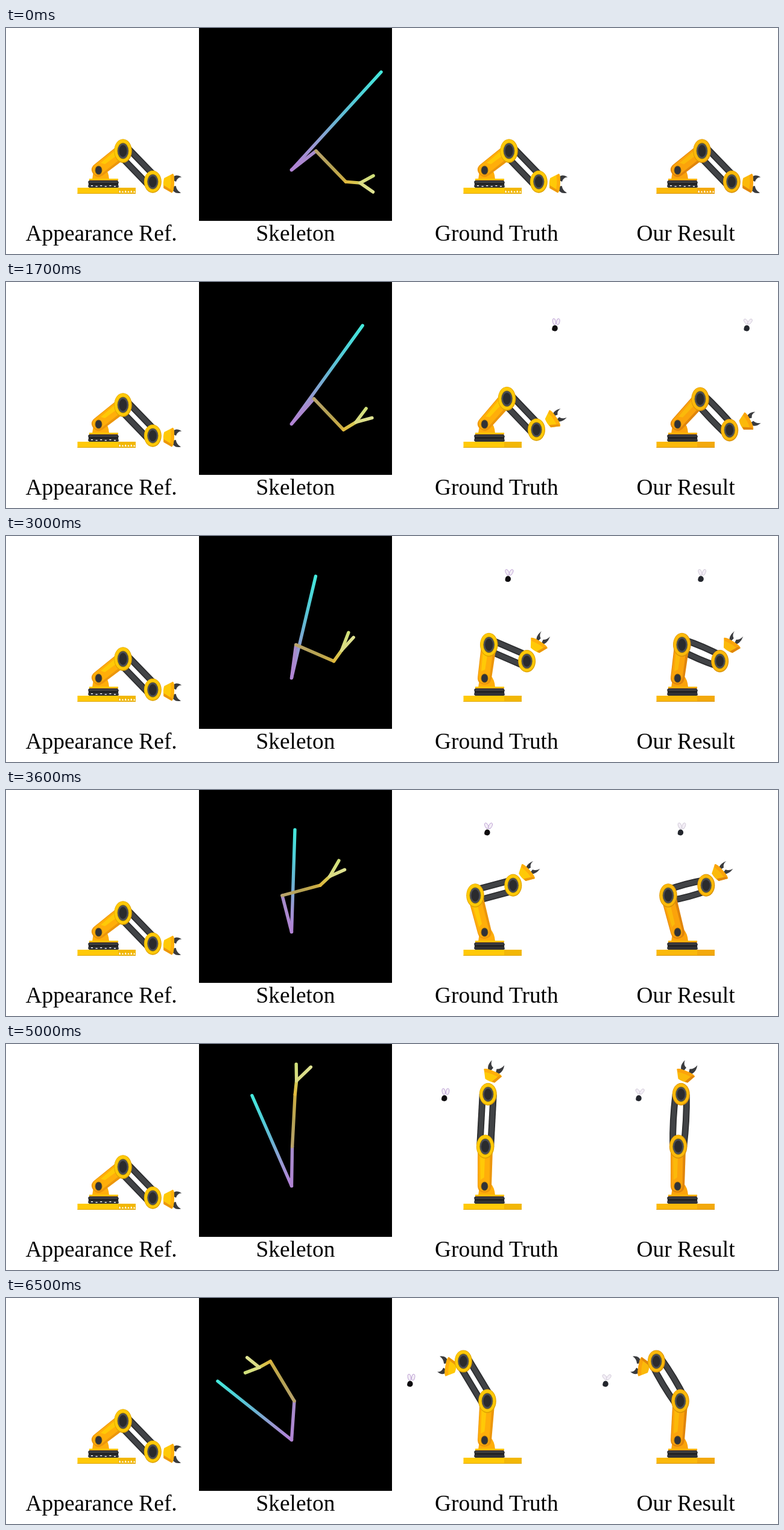
An HTML page with a canvas that plays this animation: 1280 by 375 pixels, repeating every 6600 ms.

```html
<!DOCTYPE html>
<html lang="en">
<head>
<meta charset="utf-8">
<title>Robot arm comparison</title>
<style>
  html, body { margin: 0; width: 100%; height: 100%; overflow: hidden; background: #fff; }
  canvas { position: absolute; left: 0; top: 0; }
  span {
    position: absolute; top: 321px; white-space: nowrap; color: #000;
    font: 37.4px/40px "Liberation Serif", Times, serif;
  }
</style>
</head>
<body>
<canvas id="stage" width="1280" height="375"></canvas>
<span style="left:32.5px">Appearance Ref.</span>
<span style="left:414.5px">Skeleton</span>
<span style="left:711px">Ground Truth</span>
<span style="left:1045.5px">Our Result</span>
<script>
const ctx = document.getElementById('stage').getContext('2d');
const STEP = 100, LOOP = 6600;
const BASE = { x: 153.5, y: 235.5 };

// time, elbow x y, forearm angle length, hand angle length,
// finger angles, finger lengths, fly x y
const KEYS = [
  [0,    194, 204,   46, 71,    5, 24,  -29,   35, 25, 26, 302, 73],
  [900,  193, 199,   47, 70,    5, 25,  -28,   40, 24, 25, 306, 75],
  [2400, 186, 188,   45, 72,  -61, 23,  -74,  -60, 32, 30, 228, 69],
  [3600, 138, 175,  -15, 65,  -43, 22,  -60,  -24, 30, 27, 159, 66],
  [4400, 145, 174,  -71, 83,  -29, 25,  -47,   12, 25, 25, 117, 69],
  [5100, 156, 170,  -90, 87,  -95, 22, -100,  -55, 28, 34,  83, 89],
  [5500, 160, 171, -108, 80, -139, 21, -136,  -96, 28, 36,  63, 105],
  [6500, 158, 171, -121, 77, -209, 21, -201, -141, 25, 26,  31, 138]
];

const slope = (i, c) => (KEYS[i + 1][c] - KEYS[i][c]) / (KEYS[i + 1][0] - KEYS[i][0]);

function tangent(i, c) {
  if (i === 0) return slope(0, c);
  if (i === KEYS.length - 1) return slope(i - 1, c);
  const a = slope(i - 1, c), b = slope(i, c);
  if (c >= 11) {
    const h0 = KEYS[i][0] - KEYS[i - 1][0], h1 = KEYS[i + 1][0] - KEYS[i][0];
    return (a * h1 + b * h0) / (h0 + h1);
  }
  return a * b <= 0 ? 0 : 2 * a * b / (a + b);
}

function value(t, c) {
  let i = 0;
  while (i < KEYS.length - 2 && t >= KEYS[i + 1][0]) i++;
  const h = KEYS[i + 1][0] - KEYS[i][0], u = (t - KEYS[i][0]) / h, v = 1 - u;
  return KEYS[i][c] * (1 + 2 * u) * v * v + KEYS[i + 1][c] * u * u * (3 - 2 * u)
    + h * u * v * (tangent(i, c) * v - tangent(i + 1, c) * u);
}

const rad = d => d * Math.PI / 180;
const polar = (p, deg, r) => ({ x: p.x + r * Math.cos(rad(deg)), y: p.y + r * Math.sin(rad(deg)) });

function pose(t) {
  const k = c => value(t, c);
  const elbow = { x: k(1), y: k(2) };
  const wrist = polar(elbow, k(3), k(4));
  const hand = polar(wrist, k(5), k(6));
  return {
    elbow, wrist, hand,
    tip1: polar(hand, k(7), k(9)),
    tip2: polar(hand, k(8), k(10)),
    aim: (k(7) + k(8)) / 2,
    spread: k(8) - k(7),
    reach: (k(9) + k(10)) / 2,
    fly: { x: k(11), y: k(12) }
  };
}

function rect(color, x, y, w, h) {
  ctx.fillStyle = color;
  ctx.fillRect(x, y, w, h);
}

function poly(color, pts) {
  ctx.fillStyle = color;
  ctx.beginPath();
  pts.forEach(([x, y]) => ctx.lineTo(x, y));
  ctx.fill();
}

function oval(color, x, y, rx, ry, turn = 0) {
  ctx.fillStyle = color;
  ctx.beginPath();
  ctx.ellipse(x, y, rx, ry, turn, 0, 7);
  ctx.fill();
}

function shape(color, path) {
  ctx.fillStyle = color;
  ctx.fill(new Path2D(path));
}

function bone(a, b, colors) {
  const g = ctx.createLinearGradient(a.x, a.y, b.x, b.y);
  colors.forEach((c, i) => g.addColorStop(i / (colors.length - 1), c));
  ctx.strokeStyle = g;
  ctx.lineWidth = 5.4;
  ctx.lineCap = 'round';
  ctx.beginPath();
  ctx.moveTo(a.x, a.y);
  ctx.lineTo(b.x, b.y);
  ctx.stroke();
}

function skeleton(p) {
  rect('#000', 0, 0, 320, 320);
  bone(BASE, p.fly, ['#b47fd8', '#9a98d2', '#68b4d2', '#4fd0d8', '#45e8dc']);
  bone(BASE, p.elbow, ['#b184d4', '#a58cca']);
  bone(p.elbow, p.wrist, ['#b9a36c', '#b5a254', '#cfae42']);
  bone(p.wrist, p.hand, ['#e0b83c', '#d4cc58']);
  bone(p.hand, p.tip2, ['#d8d880', '#dfe392']);
  bone(p.hand, p.tip1, ['#dcdc84', '#cfdf78']);
}

function base(tone, state) {
  if (state === 'gone') {
    for (let i = 0; i < 6; i++) rect(tone.ring, 119 + i * 12.7, 270 + i % 3, 1.5, 1);
    rect(tone.ring, 183, 267, 1.5, 8);
  } else {
    rect(tone.ring, 118.5, 265, 67.5, 10);
    rect(tone.side, 186, 265, 29, 10);
    rect(tone.edge, 118.5, 274, 96.5, 1);
  }
  poly('#303134', [[138, 253], [185, 253], [187, 256], [186, 259], [187, 264], [185, 265],
    [138, 265], [136, 263], [137, 259], [136, 255]]);
  rect('#17181a', 137, 258, 49, 1.5);
  rect('#4a4b4e', 139, 255, 45, 1);
  if (state !== 'chewed') return;
  for (let i = 0; i < 6; i++) {
    const x = 187 + i * 4.8;
    poly('#fff', [[x, 273], [x + 1.5, 269 + i % 2], [x + 3.4, 273]]);
    rect('#fff', 141 + i * 7.6, 261 + i % 2, 3, 1.4);
  }
}

function joint(tone, p, rx, ry) {
  oval(tone.edge, p.x, p.y, rx, ry);
  oval(tone.ring, p.x - .3, p.y - .4, rx - 1, ry - 1.2);
  oval('#8c7416', p.x, p.y, rx * .64, ry * .68);
  oval('#4b4d55', p.x, p.y, rx * .59, ry * .63);
  oval('#2a2b2e', p.x, p.y, rx * .44, ry * .5);
}

function forearm(a, b, bow) {
  const len = Math.hypot(b.x - a.x, b.y - a.y);
  ctx.save();
  ctx.translate(a.x, a.y);
  ctx.rotate(Math.atan2(b.y - a.y, b.x - a.x));
  ctx.lineCap = 'butt';
  for (const y of [-9, 9]) {
    for (const [color, w] of [['#2b2c2e', 11], ['#414346', 7.5]]) {
      ctx.strokeStyle = color;
      ctx.lineWidth = w;
      ctx.beginPath();
      ctx.moveTo(0, y);
      ctx.quadraticCurveTo(len / 2, y + bow * Math.sign(y), len, y);
      ctx.stroke();
    }
  }
  ctx.restore();
}

function upperArm(tone, e) {
  const len = Math.hypot(e.x - BASE.x, e.y - BASE.y);
  ctx.save();
  ctx.translate(BASE.x, BASE.y);
  ctx.rotate(Math.atan2(e.y - BASE.y, e.x - BASE.x));
  shape(tone.dark, `M0 -11.5L${len} -12.5V12.5L0 11.5Q-11 11 -11 0Q-11 -11 0 -11.5Z`);
  shape(tone.arm, `M0 -10.5L${len} -11.5V8L8 8Q-9 9 -9 0Q-9 -9 0 -10.5Z`);
  poly(tone.ring, [[10, -7], [len, -9], [len, 0], [14, -1]]);
  ctx.restore();
}

function gripper(tone, p, twist) {
  const c = polar(p.hand, p.aim, 3 + Math.max(0, p.reach - 25) * 1.2);
  const open = Math.min(1, Math.max(.65, p.spread / 55));
  ctx.save();
  ctx.translate(c.x, c.y);
  ctx.rotate(rad(p.aim + twist));
  ctx.save();
  ctx.scale(Math.min(1.3, p.reach / 25.5), open);
  shape('#3a3b3e', 'M3 -6Q8 -18 20 -11Q13 -11 11 -3Z');
  shape('#3a3b3e', 'M3 6Q8 19 20 15Q13 12 11 4Z');
  ctx.restore();
  shape(tone.ring, 'M-9 -8L5 -16Q8 -15 8 0Q8 14 5 16L-9 9Q-11 0 -9 -8Z');
  shape(tone.arm, 'M1 -13L5 -16Q8 -15 8 0Q8 14 5 16L1 13Q4 0 1 -13Z');
  shape(tone.dark, 'M-9 4L5 12L5 16L-9 9Z');
  ctx.restore();
}

function robot(tone, p, state, bow = 0, twist = 0) {
  base(tone, state);
  forearm(p.elbow, p.wrist, bow);
  shape(tone.arm, 'M143 251L145 238Q153 222 164 232Q170 238 171 251Z');
  shape(tone.ring, 'M138 250H186V253H138Z');
  rect(tone.dark, 138, 252, 48, 1);
  upperArm(tone, p.elbow);
  oval('#7d5b18', BASE.x, BASE.y + .5, 6, 7.6);
  oval('#303238', BASE.x, BASE.y + .5, 5, 6.6);
  joint(tone, p.elbow, 14.8, 19.8);
  gripper(tone, p, twist);
  joint(tone, p.wrist, 14.5, 18.6);
}

function fly(p, t, body, wing, wings) {
  const flap = .25 * Math.sin(t * .021);
  if (wings) {
    ctx.lineWidth = 1;
    ctx.strokeStyle = wing;
    for (const s of [-1, 1]) {
      oval('#f3eef6', p.x + 1 + s * 3.2, p.y - 6.5, 2.6, 5.2, s * (.4 + flap));
      ctx.stroke();
    }
  }
  oval(body, p.x - 1, p.y + 4.5, 4.6, 5);
  oval(body, p.x + (wings ? -3 : -3.5), p.y + (wings ? 6 : 2), 2.8, 2.8);
}

const CLEAN = { ring: '#ffc907', side: '#f2b705', edge: '#dfa400', arm: '#ffae0a', dark: '#ec960c' };
const MADE = { ring: '#fbb90a', side: '#f3a90c', edge: '#d99208', arm: '#fba30b', dark: '#e0850c' };

function panel(i, draw) {
  ctx.save();
  ctx.beginPath();
  ctx.rect(i * 320, 0, 320, 320);
  ctx.clip();
  ctx.translate(i * 320, 0);
  draw();
  ctx.restore();
}

function render(t) {
  const p = pose(t);
  const lag = t < 900 ? 0 : Math.min(t, (t - 900) * 2);
  const q = pose(lag);
  const glitch = t >= 5300 && t <= 5700;

  ctx.clearRect(0, 0, 1280, 375);
  panel(0, () => robot(CLEAN, pose(0), 'chewed'));
  panel(1, () => skeleton(p));
  panel(2, () => {
    robot(CLEAN, p, t < 400 ? 'chewed' : glitch ? 'gone' : 'full');
    if (t >= 800) fly(p.fly, t, '#0e0c0f', '#bda0d4', t >= 1000);
  });
  panel(3, () => {
    if (glitch) {
      poly('#2f3033', [[105, 191], [117, 187], [146, 228], [138, 238]]);
      poly('#2f3033', [[123, 166], [128, 178], [147, 200], [145, 212], [122, 181]]);
    }
    robot(MADE, q, t < 400 ? 'chewed' : 'full', 3 * Math.min(1, lag / 2400), glitch ? -20 : 0);
    const f = { x: p.fly.x - 4 + t / 800, y: p.fly.y };
    if (t >= 1600) fly(f, t + 150, '#23262d', '#cfc8d6', true);
  });
}

function tick() {
  const t = performance.now() % LOOP;
  render(Math.floor(t / STEP) * STEP);
  requestAnimationFrame(tick);
}
tick();
</script>
</body>
</html>
```
